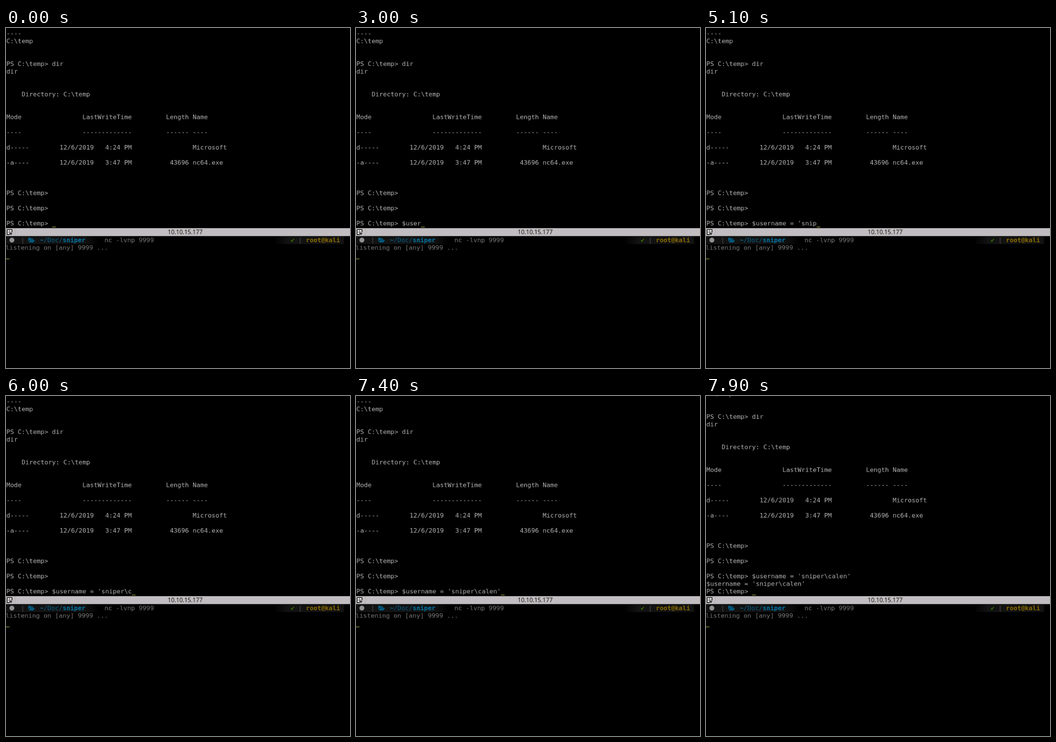
Recreate the animation shown at these times as an HTML page with a canvas. Size 752x744 px, loop 8000 ms.

```html
<!DOCTYPE html>
<html lang="en">
<head>
<meta charset="utf-8">
<title>Terminal session</title>
<style>
html, body { margin: 0; width: 100%; height: 100%; overflow: hidden; background: #000; }
canvas { display: block; width: 752px; height: 744px; }
</style>
</head>
<body>
<canvas id="stage" width="752" height="744"></canvas>
<script>
// The terminal is drawn on a whole-pixel 10 x 20 cell grid, then scaled to the stage.
const COL = 10, ROW = 20, SCALE = 0.831;
const W = 905, H = 896, BAR = 527, LIST = 549, ASCENT = 15;
const LOOP = 8000, TICK = 100, BLINK = 600, ENTER = 7700, REPLY = 7900;
const MONO = '16.61px "DejaVu Sans Mono", monospace';
const BOLD = 'bold ' + MONO;
const PROMPT = 'PS C:\\temp> ';

// A dot waits one tick, "<" deletes, anything else is typed.
const KEYS = ".....4.<.$..........us.e...n........<.r..n..a.m.e.. =.. ...'" +
  "....s.n.i..p.e.r..\\.....c.a.le...n.........'";

const history = [
  '----', 'C:\\temp', '', '',
  PROMPT + 'dir', 'dir', '', '',
  '    Directory: C:\\temp', '', '',
  'Mode                LastWriteTime         Length Name', '',
  '----                -------------         ------ ----', '',
  'd-----        12/6/2019   4:24 PM                Microsoft', '',
  '-a----        12/6/2019   3:47 PM          43696 nc64.exe', '', '', '',
  PROMPT, '', PROMPT, ''
];

const stage = document.getElementById('stage').getContext('2d', { alpha: false });
const buffer = document.createElement('canvas');
buffer.width = W;
buffer.height = H;
const ctx = buffer.getContext('2d', { alpha: false });

function rect(x, y, w, h, color) {
  ctx.fillStyle = color;
  ctx.fillRect(x, y, w, h);
}

function text(str, x, y, color, font = MONO) {
  ctx.font = font;
  ctx.fillStyle = color;
  ctx.fillText(str, x, y);
}

function poly(points, color) {
  ctx.fillStyle = color;
  ctx.beginPath();
  points.forEach(([x, y]) => ctx.lineTo(x, y));
  ctx.fill();
}

function cursor(x, cellBottom, color) {
  rect(x, cellBottom - 1.4, COL, 1.4, color);
}

function typing(t) {
  let clock = 0, last = 0, line = '';
  for (const key of KEYS) {
    if (key === '.') clock += TICK;
    if (clock > t) break;
    if (key === '.') continue;
    line = key === '<' ? line.slice(0, -1) : line + key;
    last = clock;
  }
  return { line, idle: t - last };
}

function drawShell(t) {
  const { line, idle } = typing(t);
  const lines = [...history, PROMPT + line];
  if (t >= REPLY) lines.push(line, PROMPT);
  else if (t >= ENTER) lines.push('');

  const end = lines.length - 1, bottom = 525;
  lines.forEach((str, i) => {
    text(str, 1, bottom - ROW + ASCENT - (end - i) * ROW, '#b2b2b2');
  });
  const lit = Math.floor(idle / BLINK) % 2 === 0;
  if (lit) cursor(1 + lines[end].length * COL, bottom, '#b6b64c');
}

function drawTitleBar() {
  const ink = '#111', bar = '#c1bdc0';
  rect(0, BAR, W, 21, bar);
  rect(24, BAR, 1, 21, '#aeaaad');
  // split-pane icon
  rect(2, BAR + 3, 15, 15, ink);
  for (const x of [4, 10]) {
    for (const y of [5, 11]) rect(x, BAR + y, 5, 5, '#efedef');
  }
  rect(10, BAR + 11, 8, 8, bar);
  poly([[9, BAR + 13], [17, BAR + 13], [13, BAR + 18]], ink);
  ctx.textAlign = 'center';
  text('10.10.15.177', 471.4, BAR + 16, '#151515', '15.4px "Noto Sans", "Open Sans", sans-serif');
  ctx.textAlign = 'left';
}

function drawFolder(x, y) {
  const blue = '#005f87';
  const at = points => points.map(([dx, dy]) => [x + dx, y + dy]);
  poly(at([[0, 10], [0, 0], [6, 0], [8, 2], [13, 2], [13, 5], [4, 5]]), blue);
  poly(at([[5, 6], [18, 6], [14, 12], [1, 12]]), blue);
}

function drawListener() {
  const put = (str, col, color, font, row = 0) =>
    text(str, col * COL - 1, LIST + ASCENT + row * ROW, color, font);
  const cells = (from, to, color) => rect(from * COL - 1, LIST, (to - from) * COL, ROW, color);
  const dim = '#767676', rule = '#505050', blue = '#0077a8';

  cells(0, 21, '#121212');
  cells(74, 89, '#121212');
  ['#0e0e0e', '#090909', '#050505'].forEach((shade, i) => {
    cells(21 + i, 22 + i, shade);
    cells(73 - i, 74 - i, shade);
  });
  ctx.fillStyle = '#929292';
  ctx.beginPath();
  ctx.arc(15.5, LIST + 9.5, 6.5, 0, Math.PI * 2);
  ctx.fill();
  put('|', 4, rule);
  drawFolder(58.5, LIST + 3.5);
  put('~', 9, blue, BOLD);
  put('/Doc/', 10, '#00618a');
  put('sniper', 15, blue, BOLD);
  put('nc -lvnp 9999', 26, dim);
  put('✔', 75, '#3c7600');
  put('|', 77, rule);
  put('root@kali', 79, '#896b00', BOLD);
  put('listening on [any] 9999 ...', 0, dim, MONO, 1);
  cursor(-1, LIST + 3 * ROW, '#b6b64c');
}

function draw(t) {
  rect(0, 0, W, H, '#000');
  drawShell(t);
  drawTitleBar();
  drawListener();
  stage.imageSmoothingQuality = 'high';
  stage.drawImage(buffer, 0, 0, W * SCALE, H * SCALE);
}

const start = performance.now();
function tick() {
  draw((performance.now() - start) % LOOP);
  requestAnimationFrame(tick);
}
tick();
</script>
</body>
</html>
```
